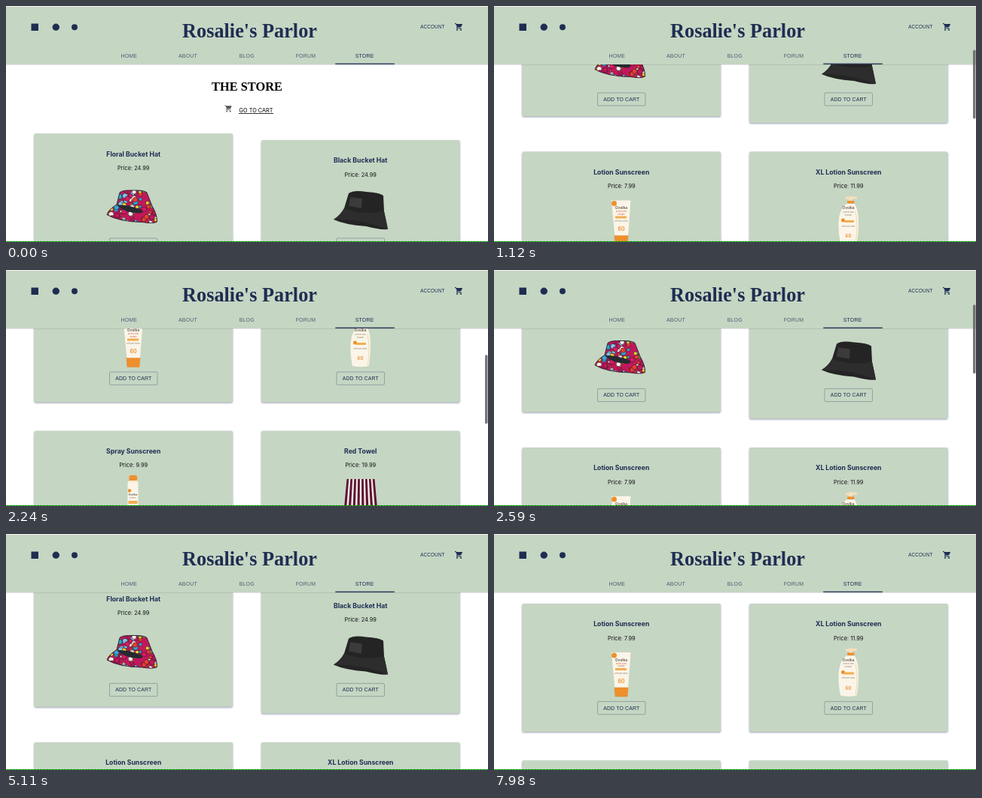
Recreate the animation shown at these times as an HTML page. Size 640 by 315 pixels, loop 8000 ms.

```html
<!DOCTYPE html>
<html lang="en">
<head>
<meta charset="utf-8">
<title>Store</title>
<style>
html, body { margin: 0; width: 100%; height: 100%; overflow: hidden; background: #fff; }
svg { display: block; }
text { text-anchor: middle; fill: #1f2d52; font-family: Inter, sans-serif; }
.serif { font-family: "Liberation Serif", serif; font-weight: 700; }
.caps { font-family: "Liberation Sans", sans-serif; letter-spacing: .16px; }
.card { fill: #c5d6c3; filter: drop-shadow(0 1px 1.2px rgba(50, 60, 100, .5)); }
.button { fill: none; stroke: #1f2d52; stroke-opacity: .38; stroke-width: .8; }
</style>
</head>
<body>
<svg id="stage" width="640" height="315" viewBox="0 0 640 315"></svg>
<script>
const NAVY = '#1f2d52', GREEN = '#c5d6c3', ORANGE = '#ee8f2c', CREAM = '#faf5e8';
const LOOP = 8000, STEP = 70;

const rect = (x, y, w, h, fill, r = 0, more = '') =>
  `<rect x="${x}" y="${y}" width="${w}" height="${h}" rx="${r}" fill="${fill}" ${more}/>`;
const disc = (x, y, r, fill) => `<circle cx="${x}" cy="${y}" r="${r}" fill="${fill}"/>`;
const path = (d, fill, more = '') => `<path d="${d}" fill="${fill}" ${more}/>`;
// y is the middle of the capitals
const label = (s, x, y, size, more = '') =>
  `<text x="${x}" y="${y + size * .36}" font-size="${size}" ${more}>${s}</text>`;
const caps = (s, x, y, size, more = '') => label(s, x, y, size, `class="caps" ${more}`);

const cart = (x, y, size, fill) => path(
  'M7 18a2 2 0 1 0 0 4 2 2 0 0 0 0-4zM1 2v2h2l3.6 7.6-1.4 2.4c-.7 1.4.3 3 1.8 3h12v-2H7.4' +
  'l-.2-.4.9-1.6h7.5c.7 0 1.4-.4 1.7-1l3.6-6.5A1 1 0 0 0 20 4H5.2l-.9-2zM17 18a2 2 0 1 0 0 4 2 2 0 0 0 0-4z',
  fill, `transform="translate(${x - size / 2} ${y - size / 2}) scale(${size / 24})"`);

function floralHat() {
  const shape = 'M151 249Q154 245.500 169 246Q183 245.500 187 249L194 267' +
    'Q201 279 200.500 288Q196 291 181 288.500Q150 288 134 278.500Q136 272 147 265Z';
  const colors = ['#d81b60', '#f5d327', '#35a9d6', '#c2185b', '#f6f2e8', '#7cc8e6', '#e8402f'];
  let seed = 11, spots = '';
  const rnd = () => (seed = seed * 16807 % 2147483647) / 2147483647;
  for (let i = 0; i < 130; i++) {
    const x = 133 + rnd() * 69, y = 245 + rnd() * 46;
    spots += `<circle cx="${x}" cy="${y}" r="${1.3 + rnd() * 2.4}" fill="${colors[i % 7]}" stroke="#2a1b28" stroke-width=".55"/>`;
  }
  return `<clipPath id="hat"><path d="${shape}"/></clipPath>` + path(shape, '#c2185b') +
    `<g clip-path="url(#hat)">${spots}</g>` +
    path('M147 266Q158 264 180 272Q184 276 177 276.500Q160 277 147 266Z', '#262a30') +
    path(shape, 'none', 'stroke="#26202a" stroke-width=".9"');
}

function blackHat() {
  return path('M455 250Q462 245 478 248Q496 249 501 253L502 274Q505 287 507 298' +
      'Q496 299 478 294Q450 292 435 285Q444 279 449 270Z', '#242424') +
    path('M449 270Q474 280 502 274Q504 284 507 298Q474 284 435 285Q445 279 449 270Z', '#2d2d2d') +
    path('M457 255L473 257L472 270L455 267Z', '#3b3b3b');
}

const brand = (x, y, size) => label('Ovelka', x, y, size, 'style="fill:#55463c" font-weight="500"');
const tiny = (s, x, y, fill) => label(s, x, y, 2.6, `style="fill:${fill}"`);
const spf = (x, y, size) => label('60', x, y, size, `style="fill:${ORANGE}" font-weight="600"`);

function tube() {
  return path('M156 453.500H181.500L178 502H160.500Z', CREAM) +
    path('M160 500.500H178L177 512.500H161Z', ORANGE, 'stroke="#d9761d" stroke-width=".4"') +
    disc(159.5, 457.5, 3.5, ORANGE) + brand(169, 463.5, 5) +
    tiny('protect and', 169, 468.5, '#d65a4a') + tiny('hydrate', 169, 471.8, '#d65a4a') +
    rect(161, 474.5, 15, 3, '#f3ae50') + tiny('soft skin lotion', 169, 481.5, '#8a7a68') + spf(169, 491.5, 7);
}

function pumpBottle() {
  return path('M467 449.500Q474 447 482 449V451.500H476V457H471V452H467Z', '#f5dfba') +
    rect(469, 454, 9.500, 3.500, ORANGE, 1) +
    path('M468 458H479Q484 467 484 482Q484 499 481.500 511Q471 513.500 460 511Q457 497 457.500 482Q459 464 468 458Z', CREAM) +
    disc(463.5, 480, 2.5, ORANGE) + brand(470.5, 463.5, 4.8) +
    tiny('protect and', 470.5, 468.8, '#8a7a68') + tiny('hydrate', 470.5, 473, '#8a7a68') +
    rect(465, 480, 13, 3, '#f3ae50') + tiny('soft skin lotion', 470.5, 488, '#8a7a68') +
    path('M480 468Q484 490 480 510', 'none', 'stroke="#f3dfb0" stroke-width="1.200"') + spf(470.5, 501, 6);
}

function spray() {
  return rect(163.5, 657, 10.5, 9, ORANGE, 2) + rect(161.5, 665, 14, 56.5, CREAM, 2) +
    rect(163, 664, 11.5, 2.5, '#f7ead0') + disc(164, 677.5, 2.3, ORANGE) +
    brand(168.5, 683, 3.6) + tiny('protect', 168.5, 687.5, '#8a7a68') +
    rect(162.5, 691, 12, 4, '#f3ae50') + tiny('sun spray', 168.5, 699, '#8a9fb0') + spf(169, 708, 6);
}

function towel() {
  let out = path('M452.500 662H489.500L495 721.500H447Z', '#f3e9e8');
  const edge = (k, top) => top ? 452.5 + 37 * k : 447 + 48 * k;
  for (let i = 0; i < 8; i++) {
    const a = i / 7.55, b = Math.min(1, a + .072);
    out += path(`M${edge(a, 1)} 662H${edge(b, 1)}L${edge(b, 0)} 721.500H${edge(a, 0)}Z`, '#5c1230');
  }
  return out;
}

function card(col, top, name, price, buttonY, picture) {
  const left = col ? 339 : 37.5, mid = left + 131.75;
  return rect(left, top, 263.5, 171, GREEN, 2, 'class="card"') +
    label(name, mid, top + 27.3, 8.7, 'font-weight="700"') +
    label('Price: ' + price, mid, top + 46, 7.4, 'style="fill:#111"') + picture() +
    rect(mid - 31.75, buttonY - 8.6, 63.5, 17.2, 'none', 1.5, 'class="button"') +
    caps('ADD TO CART', mid, buttonY, 6.9);
}

const page =
  label('THE STORE', 320, 107, 16.4, 'class="serif" style="fill:#000"') +
  cart(295.5, 137, 11, '#555') +
  label('GO TO CART', 332, 139.8, 7.3, 'style="fill:#000"') + rect(309, 143.2, 46, .8, '#000') +
  card(0, 170.3, 'Floral Bucket Hat', '24.99', 318.5, floralHat) +
  card(1, 179, 'Black Bucket Hat', '24.99', 318.5, blackHat) +
  card(0, 388.5, 'Lotion Sunscreen', '7.99', 527.7, tube) +
  card(1, 388.5, 'XL Lotion Sunscreen', '11.99', 527.7, pumpBottle) +
  card(0, 597.7, 'Spray Sunscreen', '9.99', 737, spray) +
  card(1, 597.7, 'Red Towel', '19.99', 737, towel);

const tabs = ['HOME', 'ABOUT', 'BLOG', 'FORUM', 'STORE'].map((s, i) =>
  caps(s, 163.3 + 78.2 * i, 66.2, 7, i < 4 ? 'opacity=".7"' : '')).join('');

const header =
  rect(0, 78, 640, .8, '#000', 0, 'opacity=".12"') + rect(0, 0, 640, 78, GREEN) + rect(0, 0, 640, 1, '#f2f5f1') +
  rect(33.5, 23.5, 9.5, 9.5, NAVY) + disc(66.3, 28.3, 4.7, NAVY) + disc(91, 28.3, 4, NAVY) +
  label("Rosalie's Parlor", 323.5, 32.8, 26.3, 'class="serif"') +
  caps('ACCOUNT', 566.3, 28, 6.3) + cart(601.5, 28, 12, NAVY) + tabs +
  rect(437.3, 76.6, 78.5, 1.3, NAVY);

let dashes = rect(0, 314, 640, 1, '#12b812');
for (let x = 2; x < 640; x += 4) dashes += rect(x, 314, 1, 1, '#0a4a0a');

stage.innerHTML = `<g id="scroller">${page}</g>${header}` +
  rect(636, 0, 3.5, 92, '#66686c', 1.75, 'id="thumb"') + dashes;
const scroller = document.getElementById('scroller'), thumb = document.getElementById('thumb');

// [time, scroll offset]
const keys = [[0, 0], [70, 95], [280, 260], [560, 95], [700, 78.5], [1190, 219], [1680, 416.5],
  [2030, 440], [2100, 440], [2590, 151.5], [2660, 151.5], [3080, 110.5], [5670, 110.5],
  [6230, 266.5], [6300, 266.5], [6720, 295.5], [LOOP, 295.5]];
const slope = i => keys[i + 1] ? (keys[i + 1][1] - keys[i][1]) / (keys[i + 1][0] - keys[i][0]) : 0;
const tangent = i => {
  const a = i ? slope(i - 1) : 0, b = slope(i);
  return a * b > 0 ? 2 * a * b / (a + b) : 0;
};

// monotone cubic through the keys
function offset(t) {
  const i = keys.findIndex((k, n) => t < keys[n + 1][0]);
  const [t0, a] = keys[i], [t1, b] = keys[i + 1], d = t1 - t0, u = (t - t0) / d, v = 1 - u;
  return v * v * ((1 + 2 * u) * a + u * d * tangent(i)) + u * u * ((1 + 2 * v) * b - v * d * tangent(i + 1));
}

const shown = (t, from, fade) => t < from ? 0 : Math.max(0, Math.min(1, 1 - (t - fade) / 250));

function draw(now) {
  const t = Math.floor(now % LOOP / STEP) * STEP, y = Math.round(offset(t) * 2) / 2;
  scroller.setAttribute('transform', `translate(0 ${-y})`);
  thumb.setAttribute('y', 2.2 + .29 * y);
  thumb.setAttribute('opacity', .9 * (t < 5740 ? shown(t, 70, 3500) : shown(t, 5740, 7140)));
  requestAnimationFrame(draw);
}
draw(0);
</script>
</body>
</html>
```
